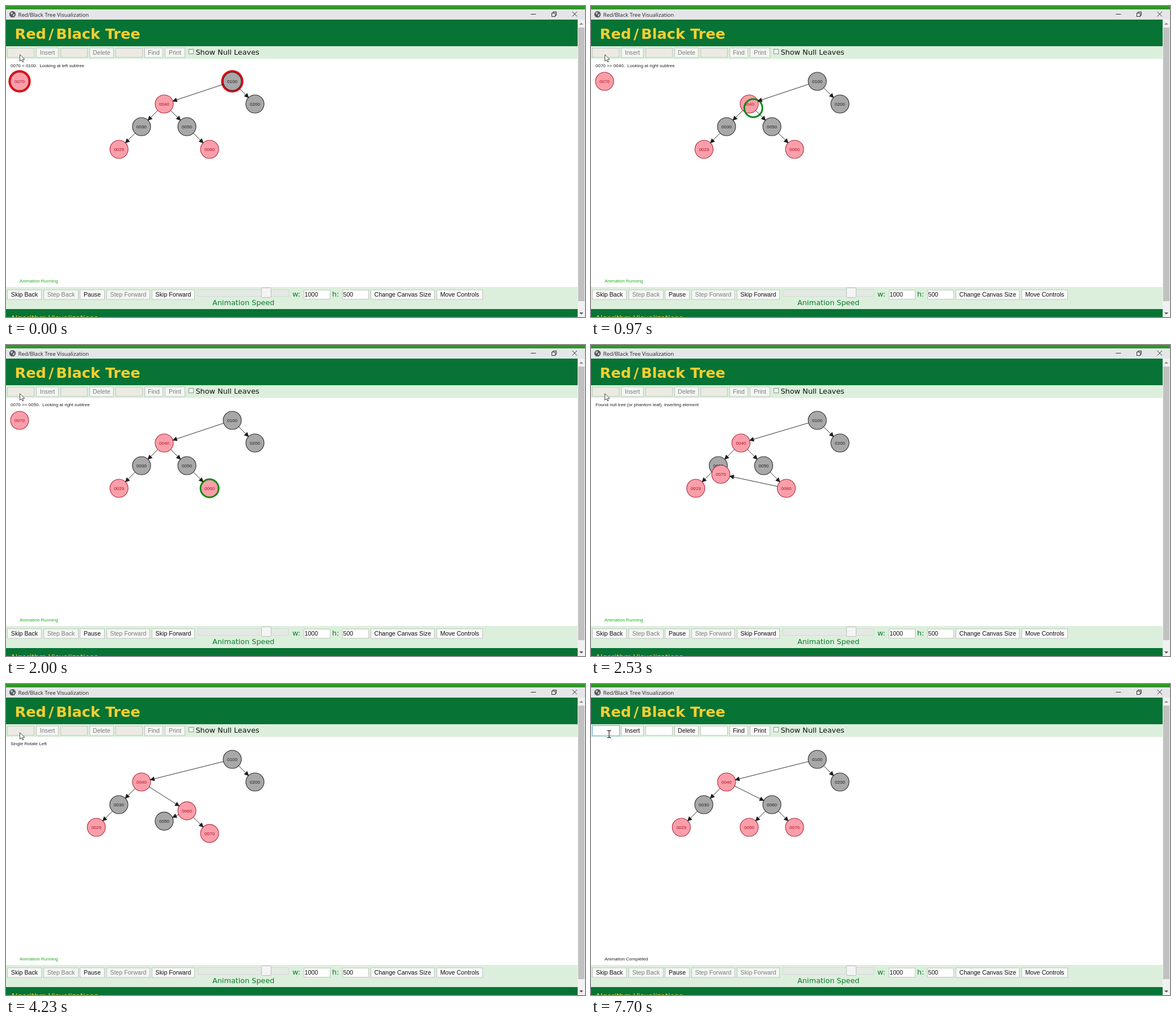
These frames come from a looping animation (1021x549 px, 7.73 s). An HTML page with a canvas:

```html
<!DOCTYPE html>
<html lang="en">
<head>
<meta charset="utf-8">
<title>Red/Black Tree Visualization</title>
<style>
  html, body { margin: 0; width: 100%; height: 100%; overflow: hidden; background: #fff; }
  canvas { display: block; }
</style>
</head>
<body>
<canvas id="stage" width="1021" height="549"></canvas>
<script>
const ctx = document.getElementById('stage').getContext('2d');

const LOOP = 7730;
const TICK = 33.6;      // one step of the tree animation
const STEPS = 11;       // steps per move
const SCALE = 0.8;
const R = 16;

const ARIAL = '"Liberation Sans", Arial, sans-serif';
const VERDANA = '"DejaVu Sans", Verdana, sans-serif';
const SMALL = `8px ${ARIAL}`;
const CONTROL = `10.67px ${ARIAL}`;
const LABEL = `12.8px ${VERDANA}`;

const GREEN = '#077334', GOLD = '#f5cf32', PALE = '#dcefdc';
const RED = '#df0a12', RING = '#118a14';
const PINK_NODE = { fill: '#f99fa9', line: '#b4283c', text: '#b0102c' };
const GREY_NODE = { fill: '#a8a8a8', line: '#2c2c2c', text: '#222' };

// Moments at which the tree's steps begin
const WALK = [
  { at: 150, from: 100, to: 40 },
  { at: 897, from: 40, to: 50 },
  { at: 1630, from: 50, to: 60 }
];
const COMPARE = [
  { at: -250, end: 150, key: 100 },
  { at: 525, end: 897, key: 40 },
  { at: 1272, end: 1630, key: 50 },
  { at: 2020, end: 2393, key: 60 }
];
const INSERT = 2393, ROTATE_HINT = 3570, ROTATE = 3938, RECOLOR = 4330, DONE = 4370;
const FOCUS = 5970, CARET = 6100, BLINK = 530;

const STATUS = [
  [0, '0070 < 0100.  Looking at left subtree'],
  [525, '0070 >= 0040.  Looking at right subtree'],
  [1272, '0070 >= 0050.  Looking at right subtree'],
  [2020, '0070 >= 0060.  Looking at right subtree'],
  [INSERT, 'Found null tree (or phantom leaf), inserting element'],
  [3200, 'Node and parent are both red, node is right child, parent is right child\n' +
         'Can fix extra redness with a single rotation'],
  [ROTATE_HINT, 'Single Rotate Left'],
  [RECOLOR, '']
];

const mix = (a, b, p) => a + (b - a) * p;
const stepsSince = (t, start) =>
  Math.max(0, Math.min(STEPS, Math.floor((t - start) / TICK)));

function box(x0, y0, x1, y1, fill, line) {
  ctx.fillStyle = fill;
  ctx.fillRect(x0, y0, x1 - x0, y1 - y0);
  if (!line) return;
  ctx.strokeStyle = line;
  ctx.lineWidth = 1;
  ctx.strokeRect(x0 + 0.5, y0 + 0.5, x1 - x0 - 1, y1 - y0 - 1);
}

function write(str, x, y, font, color, align = 'left') {
  ctx.font = font;
  ctx.fillStyle = color;
  ctx.textAlign = align;
  ctx.fillText(str, x, y);
}

function disc(x, y, r, fill) {
  ctx.beginPath();
  ctx.arc(x, y, r, 0, 2 * Math.PI);
  ctx.fillStyle = fill;
  ctx.fill();
}

function lines(color, width, ...paths) {
  ctx.strokeStyle = color;
  ctx.lineWidth = width;
  ctx.beginPath();
  for (const path of paths)
    path.forEach(([x, y], i) => i ? ctx.lineTo(x, y) : ctx.moveTo(x, y));
  ctx.stroke();
}

function polygon(points, fill) {
  ctx.beginPath();
  points.forEach(([x, y]) => ctx.lineTo(x, y));
  ctx.closePath();
  ctx.fillStyle = fill;
  ctx.fill();
}

function button(x0, x1, y, str, enabled) {
  box(x0, y, x1, y + 18, enabled ? '#f8f9f8' : '#f3f6f2', '#bcc4bc');
  write(str, (x0 + x1) / 2, y + 12.8, CONTROL, enabled ? '#111' : '#7d7d7d', 'center');
}

function drawWindow() {
  box(0, 0, 1021, 549, '#fff');
  box(0, 0, 1021, 6, '#2f9826');
  box(0, 6, 1021, 24, '#e4e6e8');

  disc(11.5, 14.7, 5.6, '#565a5e');
  polygon([[8, 12], [11, 10.5], [12, 13], [9.5, 15.5]], '#c9cccf');
  polygon([[12, 15], [15.5, 14], [14.5, 17.5], [12.5, 18.5]], '#c9cccf');
  write('Red/Black Tree Visualization', 21.5, 18.5, '9.6px "Open Sans", sans-serif', '#222');

  lines('#333', 1, [[925.5, 14.5], [934.5, 14.5]]);
  ctx.strokeRect(962.5, 12.5, 6, 6);
  lines('#333', 1, [[964.5, 12], [964.5, 10.5], [970.5, 10.5], [970.5, 16.5], [969, 16.5]]);
  lines('#333', 1, [[998.5, 10], [1007, 18.5]], [[1007, 10], [998.5, 18.5]]);

  box(0, 24, 1008, 71, GREEN);
  const title = `bold 25.6px ${VERDANA}`;
  write('Red', 15.5, 57.5, title, GOLD);
  write('/', 75, 57.5, title, GOLD);
  write('Black', 88.3, 57.5, title, GOLD);
  write('Tree', 174.9, 57.5, title, GOLD);

  box(0, 71, 1008, 93.5, PALE);
  box(0, 496, 1008, 535, PALE);
  box(0, 535, 1008, 549, GREEN);
  write('Algorithm Visualizations', 8, 554.8, LABEL, GOLD);

  box(1008, 24, 1021, 549, '#f1f1f1');
  box(1009, 38, 1020, 521, '#c1c1c1');
  polygon([[1011, 33], [1014.5, 29.5], [1018, 33]], '#8b8b8b');
  polygon([[1011, 541], [1014.5, 544.5], [1018, 541]], '#505050');
}

function drawControls(t) {
  const done = t >= DONE;
  const field = done ? '#fff' : '#ebebe4';
  const border = '#c3c9bf';

  for (const x of [2, 96, 193]) box(x, 74, x + 48, 91, field, border);
  if (t >= FOCUS) {
    box(2, 73, 51, 92, '#fff', '#66a9de');
    const blink = Math.floor(Math.max(0, t - CARET) / BLINK);
    if (blink % 2 === 0) lines('#222', 1, [[5.5, 77], [5.5, 88]]);
  }
  button(53, 93, 73.5, 'Insert', done);
  button(147, 190, 73.5, 'Delete', done);
  button(244, 277, 73.5, 'Find', done);
  button(280, 316, 73.5, 'Print', done);
  box(322, 76, 331, 85, done ? '#fff' : '#f4f4f4', '#8f958f');
  write('Show Null Leaves', 334.5, 85.7, LABEL, '#111');

  button(2, 63, 500.5, 'Skip Back', true);
  button(66, 128, 500.5, 'Step Back', false);
  button(130, 174, 500.5, 'Pause', true);
  button(177, 254, 500.5, 'Step Forward', false);
  button(257, 333, 500.5, 'Skip Forward', !done);

  box(338, 500, 499, 513, '#e5e9e5', '#d5dbd5');
  ctx.beginPath();
  ctx.roundRect(450.5, 497.5, 17, 17, 2);
  ctx.fillStyle = '#f4f4f4';
  ctx.fill();
  ctx.strokeStyle = '#b9bdb9';
  ctx.stroke();
  write('Animation Speed', 364, 528.2, LABEL, '#0b7a2c');

  write('w:', 505, 513.2, LABEL, '#0b7a2c');
  box(525, 501, 572, 518, '#fff', border);
  write('1000', 526.5, 513.2, CONTROL, '#111');
  write('h:', 575, 513.2, LABEL, '#0b7a2c');
  box(593, 501, 640, 518, '#fff', border);
  write('500', 594.5, 513.2, CONTROL, '#111');
  button(643, 756, 500.5, 'Change Canvas Size', true);
  button(759, 841, 500.5, 'Move Controls', true);
}

// The new node follows two targets at once, which bends its path.
function newNodePosition(steps) {
  let x = 24, y = 133;
  for (let i = 0; i < steps; i++) {
    const p = 1 / (STEPS - i);
    for (const goal of [379, 359]) {
      x = mix(x, goal, p);
      y = mix(y, 293, p);
    }
  }
  return { x, y };
}

function layout(t) {
  const shift = -40 * stepsSince(t, INSERT) / STEPS;
  const turn = 40 * stepsSince(t, ROTATE) / STEPS;
  const added = newNodePosition(stepsSince(t, INSERT));
  return {
    100: { x: 399, y: 133 },
    200: { x: 439, y: 173 },
    40: { x: 279 + shift, y: 173 },
    30: { x: 239 + shift, y: 213 },
    29: { x: 199.3 + shift, y: 253 },
    50: { x: 319 + shift, y: 213 + turn },
    60: { x: 359 + shift, y: 253 - turn },
    70: { x: added.x, y: added.y - turn }
  };
}

function edgeList(t) {
  const edges = [[100, 40], [100, 200], [40, 30], [30, 29]];
  if (t < ROTATE) edges.push([40, 50], [50, 60]);
  else edges.push([40, 60], [60, 50]);
  if (t >= INSERT) edges.push([60, 70]);
  return edges;
}

// Highlights swell and shrink on a triangle wave.
function pulse(t) {
  const period = 56 * 33.7;
  const phase = (((t - 570) / period) % 1 + 1) % 1;
  return (3 + 4 * Math.abs(1 - 2 * phase)) * SCALE;
}

function drawNode(key, { x, y }, style, halo) {
  if (halo) disc(x, y, R + halo, RED);
  disc(x, y, R, style.fill);
  ctx.strokeStyle = style.line;
  ctx.lineWidth = 1.1;
  ctx.stroke();
  write(String(key).padStart(4, '0'), x, y + 2.8, SMALL, style.text, 'center');
}

function drawArrow(a, b, color, width) {
  const len = Math.hypot(b.x - a.x, b.y - a.y) || 1;
  const ux = (b.x - a.x) / len, uy = (b.y - a.y) / len;
  const tip = [b.x - ux * R, b.y - uy * R];
  const back = [tip[0] - ux * 7, tip[1] - uy * 7];
  lines(color, width, [[a.x + ux * R, a.y + uy * R], tip]);
  polygon([tip,
    [back[0] - uy * 3.5, back[1] + ux * 3.5],
    [back[0] + uy * 3.5, back[1] - ux * 3.5]], color);
  ctx.stroke();
}

function drawTree(t) {
  const nodes = layout(t);
  const recolored = t >= RECOLOR;
  const pink = [40, 29, 70, recolored ? 50 : 60];
  const compare = COMPARE.find(c => t >= c.at && t < c.end);
  const lit = key => compare && (key === 70 || key === compare.key);
  const keys = [100, 200, 40, 30, 29, 50, 60, 70];

  for (const key of [...keys.filter(k => !lit(k)), ...keys.filter(lit)])
    drawNode(key, nodes[key], pink.includes(key) ? PINK_NODE : GREY_NODE, lit(key) ? pulse(t) : 0);

  WALK.forEach(({ at, from, to }, i) => {
    if (t < at || t >= COMPARE[i + 1].at) return;
    const p = stepsSince(t, at) / STEPS;
    ctx.beginPath();
    ctx.arc(mix(nodes[from].x, nodes[to].x, p), mix(nodes[from].y, nodes[to].y, p), R, 0, 2 * Math.PI);
    ctx.strokeStyle = RING;
    ctx.lineWidth = 3;
    ctx.stroke();
  });

  for (const [from, to] of edgeList(t)) {
    const a = nodes[from], b = nodes[to];
    if (from === 50 && t >= ROTATE_HINT) drawArrow(a, b, RED, pulse(t));
    drawArrow(a, b, '#1c1c1c', 0.9);
  }
}

function drawStatus(t) {
  const [, message] = STATUS.filter(([at]) => t >= at).pop();
  message.split('\n').forEach((line, i) => write(line, 8, 107.8 + i * 9.5, SMALL, '#222'));
  if (t < DONE) write('Animation Running', 24, 487.8, SMALL, '#18b018');
  else write('Animation Completed', 24, 487.8, SMALL, '#222');
}

function drawPointer(t) {
  if (t >= DONE) {
    lines('#222', 1.2,
      [[28.5, 82.3], [31, 82.3], [31.9, 83.2], [32.8, 82.3], [35.3, 82.3]],
      [[31.9, 83], [31.9, 94]],
      [[28.5, 94.7], [31, 94.7], [31.9, 93.8], [32.8, 94.7], [35.3, 94.7]]);
    return;
  }
  const shape = [[0, 0], [0, 11.5], [2.7, 9.2], [4.6, 13.2], [6.4, 12.4], [4.6, 8.6], [8.3, 8.3]];
  polygon(shape.map(([x, y]) => [24.5 + x, 85.8 + y]), '#fff');
  ctx.strokeStyle = '#333';
  ctx.lineWidth = 0.9;
  ctx.stroke();
}

function frame() {
  const t = performance.now() % LOOP;
  drawWindow();
  drawControls(t);
  drawTree(t);
  drawStatus(t);
  drawPointer(t);
  requestAnimationFrame(frame);
}
frame();
</script>
</body>
</html>
```
